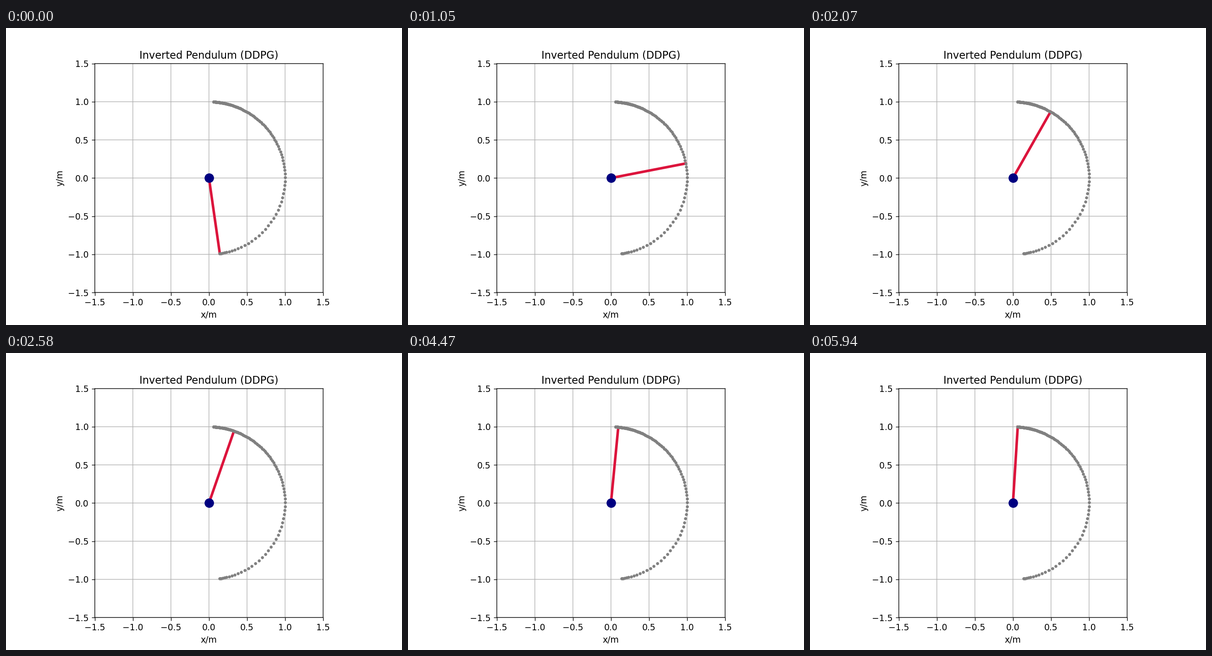
Recreate the animation shown at these times as a matplotlib script. Size 864 by 648 pixels, loop 5970 ms.

```python
import numpy as np
import matplotlib.pyplot as plt
from matplotlib.animation import FuncAnimation

FRAMES, INTERVAL = 199, 30
W, H, DPI = 864, 648, 135
START, REST = 171.8, 3.0  # degrees from upright
RATE = 0.0295             # final settling rate per step
DAMP, FREQ = 0.0575, 0.0735


def angle(n):
    """Settle from START to REST; the rate rises from zero like a damped wave."""
    wave = np.exp(-DAMP * n) * (FREQ * np.sin(FREQ * n) - DAMP * np.cos(FREQ * n))
    lag = (wave + DAMP) / (DAMP ** 2 + FREQ ** 2)
    return np.radians(REST + (START - REST) * np.exp(-RATE * (n - lag)))


theta = angle(np.arange(FRAMES))
tip_x, tip_y = np.sin(theta), np.cos(theta)

THIN = 0.72
plt.rcParams.update({
    "font.family": "DejaVu Sans",
    "path.snap": False,
    "axes.linewidth": THIN,
    "grid.linewidth": THIN,
    "xtick.major.width": THIN,
    "ytick.major.width": THIN,
})

fig = plt.figure(figsize=(W / DPI, H / DPI), dpi=DPI)
left, bottom, right, top = 193.7, 70.9, 691.9, 570.4
ax = fig.add_axes((left / W, bottom / H, (right - left) / W, (top - bottom) / H))
ticks = np.linspace(-1.5, 1.5, 7)
ax.set(xlim=(-1.5, 1.5), ylim=(-1.5, 1.5), xticks=ticks, yticks=ticks,
       xlabel="x/m", ylabel="y/m", title="Inverted Pendulum (DDPG)")
ax.grid(True)

rod, = ax.plot([], [], color="crimson", lw=3)
ax.plot(tip_x, tip_y, ".", color="gray", ms=5)
ax.plot(0, 0, "o", color="navy", ms=10)


def update(i):
    rod.set_data([0, tip_x[i]], [0, tip_y[i]])
    return rod,


anim = FuncAnimation(fig, update, frames=FRAMES, interval=INTERVAL,
                     repeat=True, repeat_delay=0)
plt.show()
```
